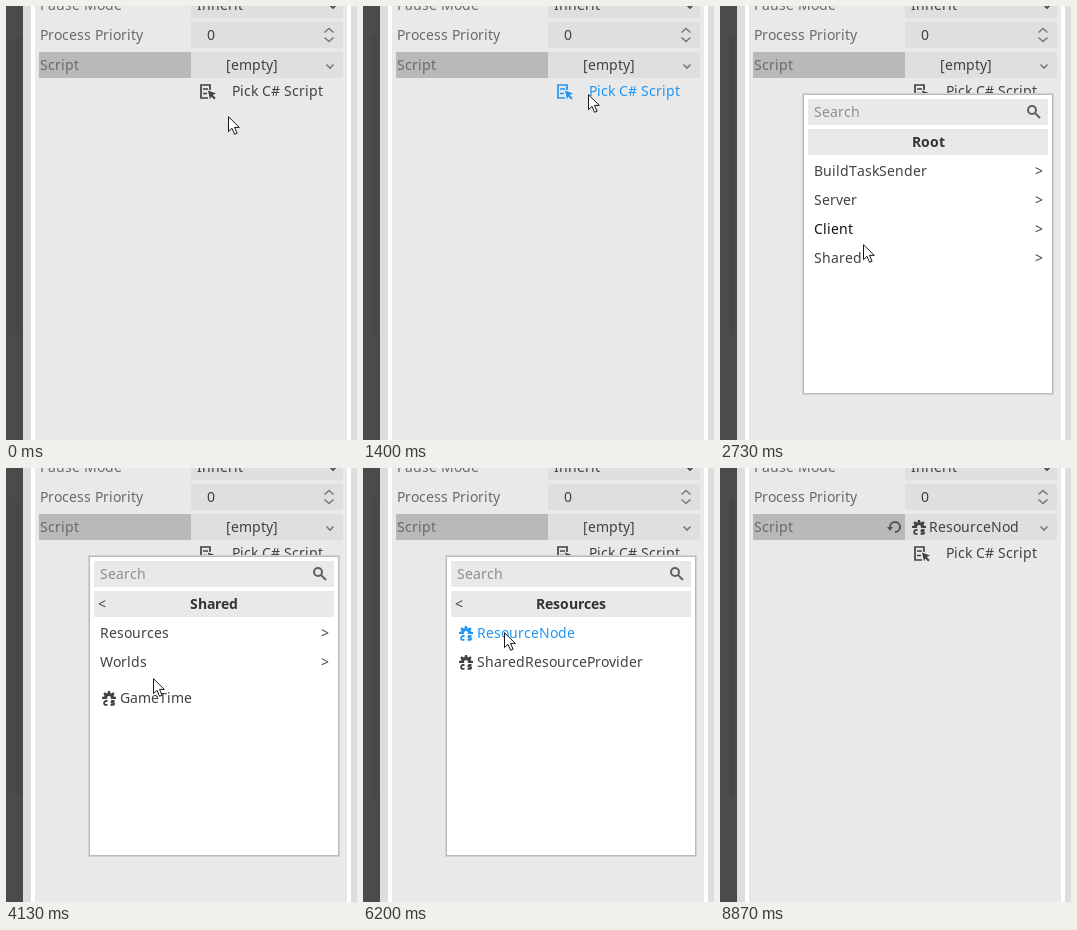
These frames come from a looping animation (351x434 px, 9270 ms). An HTML page:

```html
<!DOCTYPE html>
<html lang="en">
<head>
<meta charset="utf-8">
<title>Pick a script</title>
<style>
html, body { margin: 0; width: 100%; height: 100%; overflow: hidden; background: #e9e9e9; }
svg { display: block; }
text { font: 14px "Noto Sans", sans-serif; white-space: pre; }
.bold { font-weight: 700; }
</style>
</head>
<body>
<svg width="351" height="434" viewBox="0 0 351 434">
  <defs>
    <g id="gear">
      <path d="M7 1 6.44 3.26a5 5 0 0 0-.69.28L3.76 2.34 2.34 3.76 3.54 5.75a5 5 0 0 0-.29.69L1 7v2h5.27A2 2 0 0 1 8 6a2 2 0 0 1 1.73 3H15V7l-2.26-.56a5 5 0 0 0-.28-.69l1.2-1.99-1.42-1.42-1.99 1.2a5 5 0 0 0-.69-.29L9 1Z"/>
      <path d="M6.5 11H5a1.9 1.9 0 0 0 0 3.8h1.5M13.5 11h-2.2a.9.9 0 0 0 0 1.9h.9a.9.9 0 0 1 0 1.9H9.5" fill="none" stroke="currentColor" stroke-width="1.8"/>
    </g>
    <g id="pick">
      <path d="M11 7V2H2V15H9M4 6H9M4 10.5H8" fill="none" stroke="currentColor" stroke-width="1.7"/>
      <path d="M9 7.5l8 3-3.3 1.5 3 3-1.5 1.5-3-3-1.2 3Z"/>
    </g>
    <path id="undo" d="M9 2a6 6 0 0 0-6 6H1l3 4 3-4H5a4 4 0 1 1 4 4v2A6 6 0 0 0 9 2Z"/>
    <path id="arrow" d="M.5.7V15.6L4 12.3l2.6 6 2.5-1.1-2.6-5.8h4.8Z" fill="#fff" stroke="#16161e"/>
  </defs>
  <rect width="17" height="434" fill="#4b4b4b"/>
  <rect x="9" y="30" width="6" height="299" fill="#474747"/>
  <rect x="17" width="334" height="434" fill="#dedddd"/>
  <rect x="25" width="320" height="434" fill="#fff"/>
  <rect x="29" width="312" height="434" fill="#e9e9e9"/>
  <path d="M185 0h152v12H185ZM185 16h152v26H185ZM185 46h152v26H185Z" fill="#dfdfdf"/>
  <path d="M33 46h152v26H33Z" fill="#b9b9b9"/>
  <g fill="none" stroke="#7a7a7a" stroke-width="1.6">
    <path d="M323-2l4 4 4-4" stroke="#444"/>
    <path d="M318.5 26.5l4.5-4 4.5 4M318.5 31.5l4.5 4 4.5-4"/>
    <path d="M320.5 58.5l3.5 3.5 3.5-3.5"/>
  </g>
  <g id="live"></g>
</svg>
<script>
const FPS = 15, STEPS = 139;
const INK = '#424242', LABEL = '#6a6a6a', HOVER = '#151515', BLUE = '#2196f3';
const live = document.getElementById('live');
const pen = document.createElement('canvas').getContext('2d');

// Pointer moves: [first step, last step, x, y]
const moves = [
  [0, 9, 225, 88], [35, 41, 143, 238], [41, 45, 143, 255],
  [57, 62, 147, 210], [62, 71, 142, 159], [84, 86, 141, 164],
  [110, 111, 143, 154], [111, 115, 173, 83], [115, 121, 87, 255],
  [121, 122, 60, 440], [127, 128, 56, 424], [132, 133, 57, 440]
];

const pages = {
  Root: { folders: ['BuildTaskSender', 'Server', 'Client', 'Shared'], scripts: [] },
  Shared: { folders: ['Resources', 'Worlds'], scripts: ['GameTime'] },
  Resources: { folders: [], scripts: ['ResourceNode', 'SharedResourceProvider'] }
};

const icon = (id, x, y, color = INK) =>
  `<use href="#${id}" x="${x}" y="${y}" fill="${color}" color="${color}"/>`;
const within = (n, a, b) => n >= a && n < b;

// Text with every glyph advance snapped to whole pixels
function text(s, x, y, fill = INK, bold = false) {
  pen.font = `${bold ? 700 : 400} 14px "Noto Sans", sans-serif`;
  const widths = [...s].map(c => Math.round(pen.measureText(c).width));
  if (bold) x = Math.round(x - widths.reduce((a, b) => a + b) / 2);
  const xs = widths.map(w => (x += w) - w);
  const safe = s.replace('<', '&lt;').replace('>', '&gt;');
  return `<text x="${xs.join(' ')}" y="${y}" fill="${fill}" class="${bold ? 'bold' : ''}">${safe}</text>`;
}

function pointer(n) {
  let x = 222, y = 110;
  for (const [a, b, u, v] of moves) {
    const k = Math.min(1, Math.max(0, (n - a) / (b - a)));
    x += (u - x) * k;
    y += (v - y) * k;
  }
  return [Math.round(x), Math.round(y)];
}

function field(picked) {
  if (!picked) return text('[empty]', 220, 64);
  return icon('undo', 166, 51, '#555') + icon('gear', 191, 51) + text('ResourceNod', 209, 64);
}

function popup(title, y, pressed) {
  const { folders, scripts } = pages[title];
  const rows = [...folders, ...scripts].map((label, i) => {
    const script = i >= folders.length;
    const mid = 165 + 29 * i + (script && folders.length ? 7 : 0);
    const over = within(y - mid, -13, 16);
    const color = over ? (pressed ? BLUE : HOVER) : INK;
    return script
      ? icon('gear', 95, mid - 8, color === BLUE ? BLUE : INK) + text(label, 114, mid + 5, color)
      : text(label, 94, mid + 5, color) + text('>', 315, mid + 5);
  });
  return `<rect x="82.5" y="87.5" width="251" height="301" fill="none" stroke="#d2d2d2"/>
    <rect x="83.5" y="88.5" width="249" height="299" fill="#fff" stroke="#bababa"/>
    <path d="M88 93h240v26H88ZM88 123h240v26H88Z" fill="#e9e9e9"/>
    <g fill="none" stroke="#606060" stroke-width="2">
      <circle cx="312" cy="104" r="4"/><path d="M315 107l5 5"/>
    </g>` +
    text('Search', 94, 111, '#8e8e8e') + text(title, 208, 141, '#333', true) +
    (title === 'Root' ? '' : text('<', 92, 141)) + rows.join('');
}

function draw(n) {
  const [x, y] = pointer(n);
  const open = within(n, 25, 96);
  const over = !open && y < 96 && x > 185;
  const pick = within(n, 21, 25) ? BLUE : over ? HOVER : INK;
  const title = n < 51 ? 'Root' : n < 73 ? 'Shared' : 'Resources';
  const pressed = within(n, 48, 51) || n === 72 || within(n, 93, 96);
  live.innerHTML =
    text('Pause Mode', 34, 4, LABEL) + text('Inherit', 191, 4) +
    text('Process Priority', 34, 34, LABEL) + text('0', 201, 34) +
    text('Script', 34, 64, LABEL) + field(n >= 96) +
    icon('pick', 193, 77, pick) + text('Pick C# Script', 226, 90, pick) +
    (open ? popup(title, y, pressed) : '') +
    `<use href="#arrow" x="${x}" y="${y}"/>`;
}

let last = -1;
function tick() {
  const n = Math.floor((performance.now() + 4) * FPS / 1000) % STEPS;
  if (n !== last) draw(last = n);
  requestAnimationFrame(tick);
}
tick();
</script>
</body>
</html>
```
